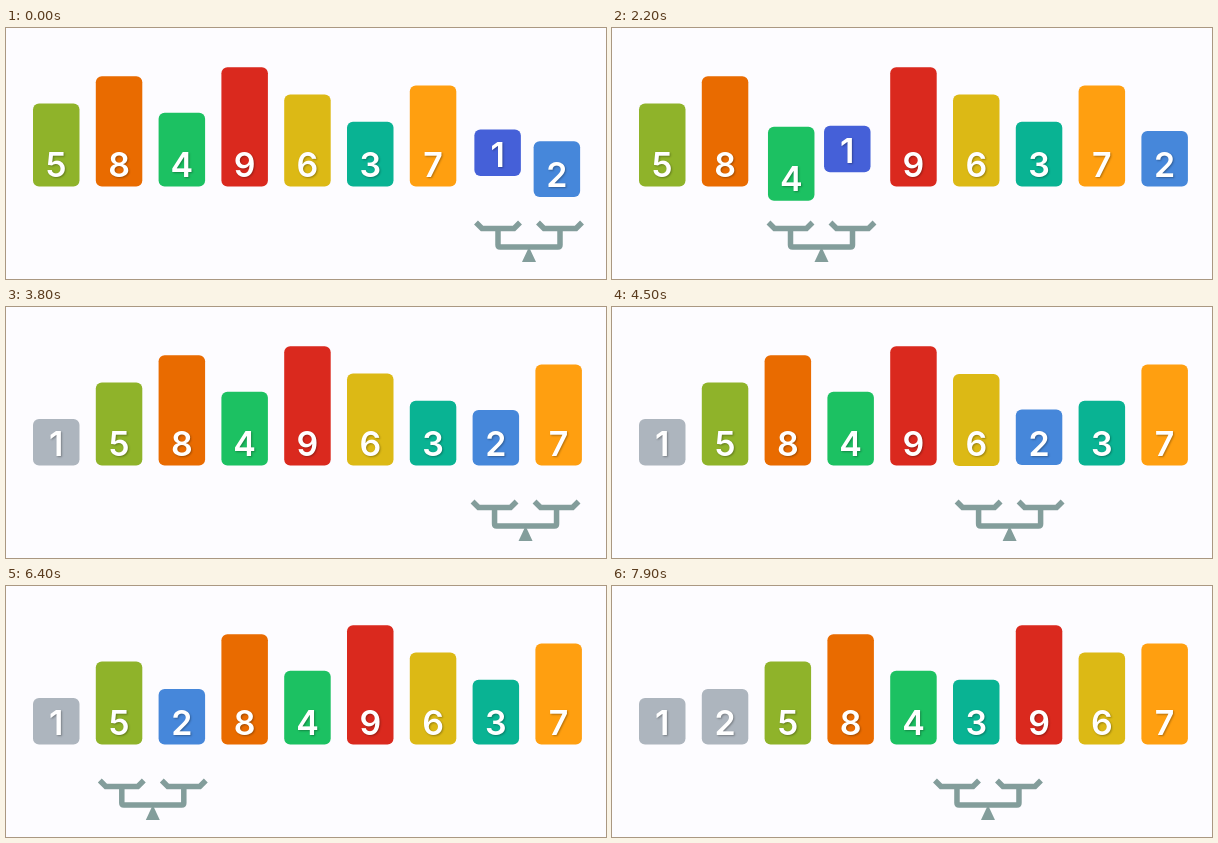
Write an HTML page with a canvas that moves like this. It is 600 by 251 pixels and loops after 8 s.

```html
<!DOCTYPE html>
<html lang="en">
<head>
<meta charset="utf-8">
<title>Bubble sort</title>
<style>
html, body { margin: 0; width: 100%; height: 100%; overflow: hidden; background: #fdfcff; }
canvas { display: block; }
</style>
</head>
<body>
<canvas width="600" height="251"></canvas>
<script>
const ctx = document.querySelector('canvas').getContext('2d');
const LOOP = 8000, SWAP = 242, PAUSE = 234, GLIDE = 200;
const PITCH = 62.8, WIDTH = 46.5, FLOOR = 158.5;
const COLORS = ['#4560d8', '#4687da', '#09b393', '#1cc162', '#8fb32a',
  '#dcb915', '#ff9f10', '#e96b00', '#da291e'];
const DONE = '#adb5be';
const START = [5, 8, 4, 9, 6, 3, 7, 2, 1];
const PASSES = [-215, 3548, 6880]; // time of each pass's first comparison

// Run the sort up to time t.
function stateAt(t) {
  const bars = [...START];
  const state = { bars, sorted: 0, pair: 7, swap: null };
  let left = -Infinity, from = 7;
  for (let p = 0; p < PASSES.length; p++) {
    let time = PASSES[p];
    for (let j = 7; j >= p; j--) {
      if (t >= left) {
        const k = Math.min(1, (t - left) / GLIDE);
        state.pair = from + (j - from) * k;
      }
      if (t < time) return state;
      if (bars[j] > bars[j + 1]) {
        if (t < time + SWAP) {
          state.swap = { j, angle: (t - time) / SWAP * Math.PI };
          return state;
        }
        [bars[j], bars[j + 1]] = [bars[j + 1], bars[j]];
        time += SWAP;
      }
      left = time;
      from = j;
      time += PAUSE;
    }
    state.sorted = p + 1;
  }
  return state;
}

function drawBar(n, slot, lift, done) {
  const h = 46.5 + 9.1 * (n - 1), x = 27 + slot * PITCH, bottom = FLOOR - lift;
  ctx.fillStyle = done ? DONE : COLORS[n - 1];
  ctx.beginPath();
  ctx.roundRect(x, bottom - h, WIDTH, h, 6);
  ctx.fill();
  ctx.save();
  ctx.shadowColor = 'rgba(0,0,0,.3)';
  ctx.shadowBlur = 2;
  ctx.shadowOffsetX = ctx.shadowOffsetY = 1;
  ctx.fillStyle = '#fff';
  ctx.fillText(n, x + WIDTH / 2, bottom - 9.5);
  ctx.restore();
}

function drawScale(pair) {
  ctx.save();
  ctx.translate(84.1 + pair * 62.7, 0);
  ctx.strokeStyle = ctx.fillStyle = '#839d9b';
  ctx.lineWidth = 5.5;
  ctx.stroke(new Path2D('M-53 194.5l6 6h32l6-6M53 194.5l-6 6h-32l-6-6' +
    'M-31 200v17q0 2 2 2H29q2 0 2-2v-17'));
  ctx.fill(new Path2D('M0 219l7 15h-14z'));
  ctx.restore();
}

function draw(now) {
  const { bars, sorted, pair, swap } = stateAt(now % LOOP);
  ctx.fillStyle = '#fdfcff';
  ctx.fillRect(0, 0, 600, 251);
  ctx.font = '600 34px Inter, "Noto Sans", sans-serif';
  ctx.textAlign = 'center';
  drawScale(pair);
  bars.forEach((n, i) => {
    if (!swap || (i !== swap.j && i !== swap.j + 1)) drawBar(n, i, 0, i < sorted);
  });
  if (swap) {
    // The pair turns half a circle about its midpoint.
    const { j, angle } = swap;
    const dx = Math.cos(angle) / 2, lift = Math.sin(angle) * PITCH / 2;
    drawBar(bars[j], j + 0.5 - dx, -lift);
    drawBar(bars[j + 1], j + 0.5 + dx, lift);
  }
}

const t0 = performance.now();
function frame() {
  draw(performance.now() - t0);
  requestAnimationFrame(frame);
}
frame();
</script>
</body>
</html>
```
